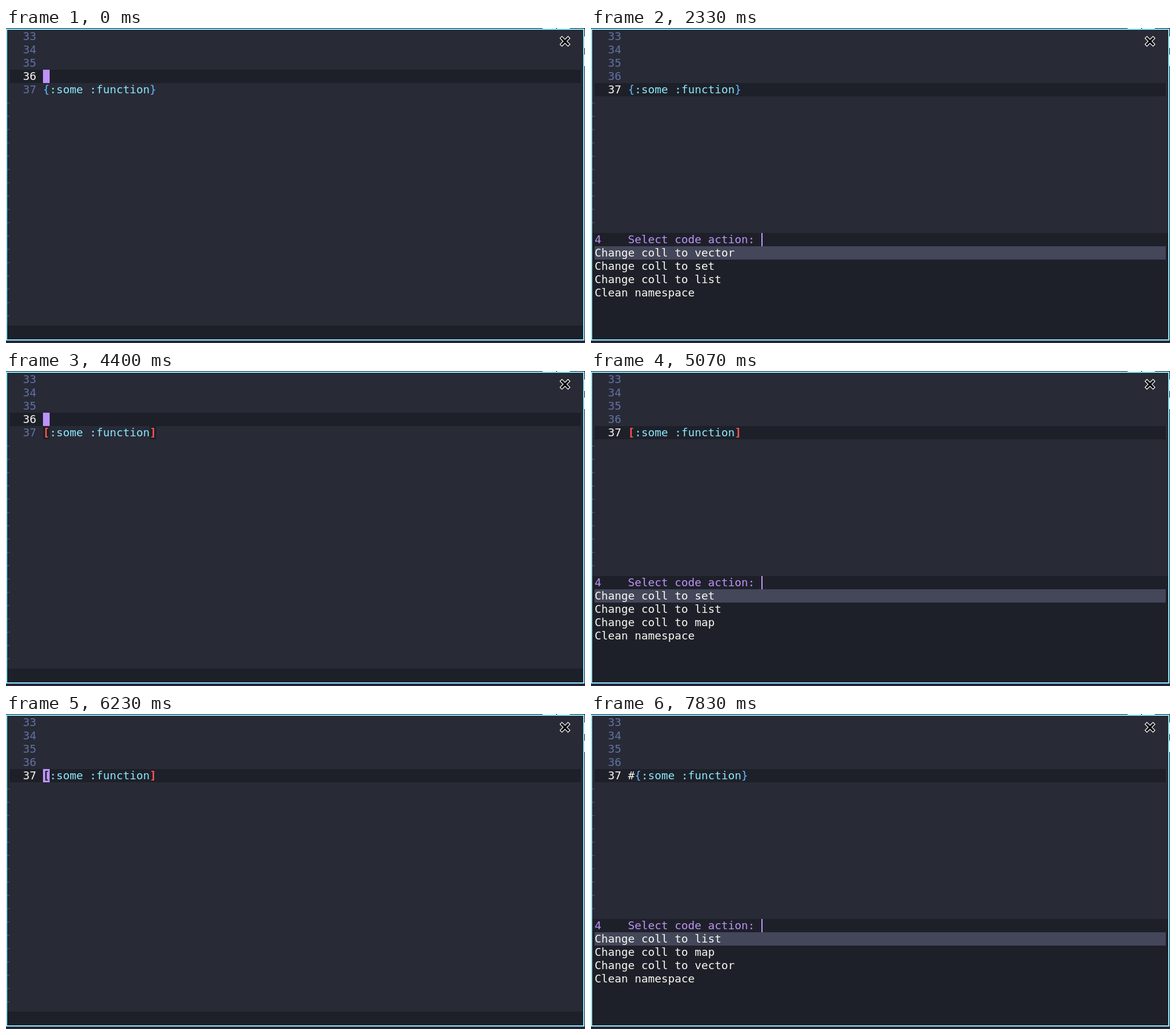
An HTML page that plays this animation: 955x521 px, repeating every 8000 ms.

```html
<!DOCTYPE html>
<html lang="en">
<head>
<meta charset="utf-8">
<title>Code actions</title>
<style>
html, body { margin: 0; width: 100%; height: 100%; overflow: hidden; background: #28243a; }
#stage {
  position: relative; width: 955px; height: 521px; overflow: hidden;
  font: 18.27px/22px "DejaVu Sans Mono", monospace; color: #f8f8f2; white-space: pre;
}
#stage div, svg { position: absolute; }
#editor { left: 0; top: 1px; width: 954px; height: 516px; background: #282a36; }
#frame { left: 0; top: 1px; width: 950px; height: 512px; border: 2px solid #8be9fd; }
#hl { left: 6px; width: 942px; height: 22px; background: #1e2029; }
.num { left: 28px; color: #6272a4; }
.num.on { color: #f8f8f2; }
#code { left: 61px; top: 91px; height: 22px; color: #8be9fd; }
#code span { display: inline-block; height: 22px; vertical-align: top; }
#code .br { color: #61bfff; }
#code .match { color: #ff5555; background: #1e2029; font-weight: bold; }
#code .hash { color: #f8f8f2; }
#code .sym { background: #44475a; }
#code .at { color: #1e2029; background: #bd93f9; }
#block { left: 61px; top: 69px; width: 11px; height: 22px; background: #bd93f9; }
#bar { left: 2px; top: 492px; width: 950px; height: 23px; background: #1e2029; }
#echo { left: 4px; top: 1px; height: 22px; background: #23252f; }
#popup { left: 2px; top: 339px; width: 950px; height: 176px; background: #1e2029; }
#prompt { left: 4px; top: 0; color: #bd93f9; }
#caret { left: 279px; top: 0; width: 2px; height: 22px; background: #bd93f9; }
.item { left: 4px; width: 942px; height: 22px; }
.item.first { background: #44475a; }
svg { left: 0; top: 0; }
</style>
</head>
<body>
<div id="stage"><div id="editor"></div><div id="hl"></div><svg id="marks" width="955" height="521" fill="none" stroke="#59617f"></svg><div id="code"></div><div id="block"></div><div id="bar"><div id="echo"></div></div><div id="popup"><div id="prompt">4    Select code action:</div><div id="caret"></div></div><div id="frame"></div><svg width="955" height="521">
<path d="M885 0h22v1h-22zM909 0h21v1h-21zM954 14h1v19h-1zM954 44h1v19h-1z" fill="#fff"/>
<g fill="none" stroke-linecap="square">
<path d="M917 17l10 10M927 17l-10 10" stroke="#fff" stroke-width="5.6"/>
<path d="M917 17l10 10M927 17l-10 10" stroke="#000" stroke-width="3.2"/>
</g></svg></div>
<script>
const LOOP = 8000;
const $ = id => document.getElementById(id);
const stage = $("stage");

function add(parent, cls, text, top) {
  const el = document.createElement("div");
  el.className = cls;
  el.textContent = text;
  el.style.top = top + "px";
  parent.append(el);
  return el;
}

const nums = [33, 34, 35, 36, 37].map((n, i) => add(stage, "num", n, 3 + 22 * i));
const items = [0, 1, 2, 3].map(i => add($("popup"), i ? "item" : "item first", "", 22 + 22 * i));

let marks = "";
for (let y = 124; y < 480; y += 22) marks += `M2.5 ${y + 1}q0-1.5 1.2-1.5t1.2.7 1.1-.2`;
$("marks").innerHTML = `<path d="${marks}"/>`;

const DONE = "Applying 1 edits to `foo.clj'...done";
const MAP = ["", "{", "}"], VEC = ["", "[", "]"], SET = ["#", "{", "}"];
const base = { row: 37, cursor: true, match: false, sym: false, echo: "", menu: null };

// Each step changes the state that came before it.
const steps = [
  [0, { ...base, row: 36, coll: MAP }],
  [670, { row: 37, match: true }],
  [1200, { echo: "function", sym: true }],
  [1370, { sym: false, match: false }],
  [1470, { match: true }],
  [1830, { echo: "" }],
  [2030, { cursor: false, menu: ["vector", "set", "list"] }],
  [2130, { match: false }],
  [3330, { cursor: true, menu: null }],
  [3400, { match: true }],
  [3870, { coll: VEC, match: false, echo: DONE }],
  [3970, { match: true }],
  [4400, { row: 36, echo: "" }],
  [4500, { match: false }],
  [4770, { row: 37 }],
  [4870, { match: true }],
  [4970, { cursor: false, menu: ["set", "list", "map"] }],
  [5100, { match: false }],
  [6230, { cursor: true, menu: null, match: true }],
  [6800, { coll: SET, match: false, echo: DONE }],
  [7070, { row: 36, echo: "" }],
  [7370, { row: 37, match: true }],
  [7600, { cursor: false, menu: ["list", "map", "vector"] }],
  [7730, { match: false }]
];
let last = {};
const states = steps.map(([at, change]) => (last = { ...last, ...change, at }));

const span = (cls, text) => `<span class="${cls}">${text}</span>`;

function draw(s) {
  const [hash, open, close] = s.coll;
  const br = s.match ? "br match" : "br";
  const at = s.cursor && s.row === 37 ? " at" : "";
  $("code").innerHTML =
    (hash && span("hash" + at, hash)) + span(br + (hash ? "" : at), open) +
    ":some " + span(s.sym ? "sym" : "", ":function") + span(br, close);
  $("hl").style.top = 3 + 22 * (s.row - 33) + "px";
  $("block").hidden = s.row !== 36;
  nums.forEach((el, i) => el.classList.toggle("on", i + 33 === s.row));
  $("echo").textContent = s.echo && s.echo + " ";
  $("popup").hidden = !s.menu;
  if (s.menu) items.forEach((el, i) => {
    el.textContent = i < 3 ? "Change coll to " + s.menu[i] : "Clean namespace";
  });
}

let shown;
const start = performance.now();
function tick() {
  const t = (performance.now() - start) % LOOP;
  const now = states.findLast(s => s.at <= t) || states[0];
  if (now !== shown) draw(shown = now);
  requestAnimationFrame(tick);
}
tick();
</script>
</body>
</html>
```
